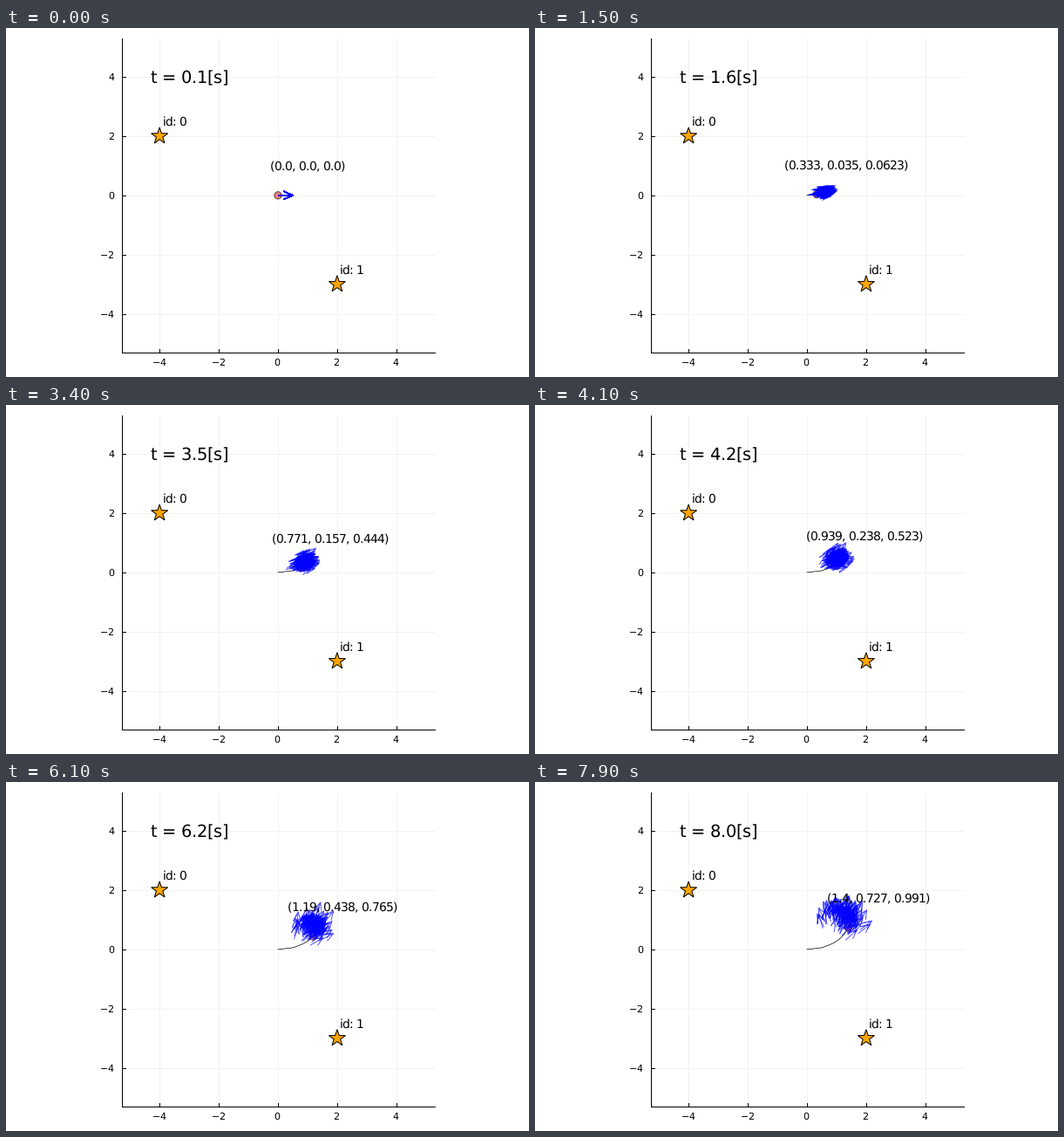
Write a matplotlib script that moves like this. It is 600 px wide and 400 px high and loops after 8 s.

```python
from functools import lru_cache

import matplotlib.pyplot as plt
import numpy as np
from matplotlib.animation import FuncAnimation
from matplotlib.collections import LineCollection
from matplotlib.patches import Circle, PathPatch, Polygon
from matplotlib.path import Path
from matplotlib.textpath import TextPath

W, H, DPI = 600, 400, 100
PX = 72 / DPI                      # one pixel in points
FRAMES, DT = 80, 0.1
UNIT, CX, CY = 33.96, 312, 208.2   # world to pixels, y upwards
LEFT, RIGHT, BOTTOM, TOP = 132.5, 492, 28.5, 388

plt.rcParams["font.family"] = "DejaVu Sans"


def to_px(x, y):
    return CX + UNIT * np.asarray(x), CY + UNIT * np.asarray(y)


# ---- text set with whole-pixel advances ----
@lru_cache(None)
def advance(ch, size):
    right = lambda s: TextPath((0, 0), s, size=100).vertices[:, 0].max()
    return int((right("0" + ch + "0") - right("00")) * size / 100)


@lru_cache(None)
def glyph(ch, size):
    return TextPath((0, 0), ch, size=size)


def text_path(s, cx, cy, size, align=0.5):
    x = round(cx - align * sum(advance(c, size) for c in s))
    y = round(cy - 0.365 * size)
    verts, codes = [], []
    for c in s:
        if c != " ":
            g = glyph(c, size)
            verts.append(g.vertices + [x, y])
            codes.append(g.codes)
        x += advance(c, size)
    return Path(np.concatenate(verts), np.concatenate(codes))


def add_text(s, cx, cy, size, align=0.5):
    patch = PathPatch(text_path(s, cx, cy, size, align), fc="black", lw=0, zorder=9)
    return ax.add_patch(patch)


def number(v):
    s = f"{v:.3g}".replace("e-0", "e-")
    return s if "." in s or "e" in s else s + ".0"


SMALL, MEDIUM, LARGE = 8 / PX, 10 / PX, 14 / PX

# ---- robot pose: cubic path through a few poses (step, x, y, heading) ----
KEYS = np.array([
    (0, 0, 0, 0),
    (15, 0.333, 0.035, 0.0623),
    (26, 0.571, 0.0803, 0.353),
    (41, 0.939, 0.238, 0.523),
    (53, 1.09, 0.346, 0.705),
    (61, 1.19, 0.438, 0.765),
    (79, 1.4, 0.727, 0.991),
])


def pose(step):
    i = min(np.searchsorted(KEYS[:, 0], step, side="right") - 1, len(KEYS) - 2)
    a, b = KEYS[i], KEYS[i + 1]
    u = (step - a[0]) / (b[0] - a[0])
    chord = np.hypot(*(b[1:3] - a[1:3]))
    ta, tb = (chord * np.array([np.cos(k[3]), np.sin(k[3])]) for k in (a, b))
    h = u * u * (3 - 2 * u)
    xy = (a[1:3] * (1 - h) + b[1:3] * h
          + ta * u * (1 - u) ** 2 - tb * u * u * (1 - u))
    return xy[0], xy[1], a[3] + (b[3] - a[3]) * u


poses = np.array([pose(k) for k in range(FRAMES)])


# ---- particle cloud: noisy velocity motion ----
def simulate(count=100, v=0.205, w=0.16, seed=4):
    rng = np.random.default_rng(seed)
    p = np.zeros((count, 3))
    steps = [p.copy()]
    sd_v = 0.19 * np.sqrt(v / DT)
    sd_w = np.sqrt(0.13 ** 2 * v / DT + 0.2 ** 2 * w / DT)
    for _ in range(FRAMES - 1):
        nv = v + sd_v * rng.standard_normal(count)
        nw = w + sd_w * rng.standard_normal(count)
        mid = p[:, 2] + nw * DT / 2
        p += DT * np.column_stack([nv * np.cos(mid), nv * np.sin(mid), nw])
        steps.append(p.copy())
    return steps


cloud = simulate()


def arrows(p, length=0.5 * UNIT, back=10, half=4.5):
    x, y = to_px(p[:, 0], p[:, 1])
    tail = np.column_stack([x, y])
    d = np.column_stack([np.cos(p[:, 2]), np.sin(p[:, 2])])
    n = d[:, ::-1] * [-1, 1]
    tip = tail + length * d
    base = tip - back * d
    return np.stack([tail, tip, base + half * n, tip, base - half * n], axis=1)


# ---- static scene ----
fig = plt.figure(figsize=(W / DPI, H / DPI), dpi=DPI, facecolor="white")
ax = fig.add_axes([0, 0, 1, 1])
ax.set_xlim(0, W)
ax.set_ylim(0, H)
ax.axis("off")


def line(xs, ys, color="black", z=2):
    ax.plot(xs, ys, color=color, lw=PX, zorder=z)


for v in range(-4, 5, 2):
    gx, gy = to_px(v, v)
    line([gx, gx], [BOTTOM, TOP], "#f2f2f2", 1)
    line([LEFT, RIGHT], [gy, gy], "#f2f2f2", 1)
    line([gx, gx], [BOTTOM, BOTTOM + 4])
    line([LEFT, LEFT + 4], [gy, gy])
    label = str(v).replace("-", "\u2212")
    add_text(label, gx, 17, SMALL)
    add_text(label, 124.5, gy, SMALL, align=1)
line([LEFT, LEFT], [BOTTOM, TOP])
line([LEFT, RIGHT], [BOTTOM, BOTTOM])

for i, (sx, sy) in enumerate([(-4, 2), (2, -3)]):
    a = np.pi / 2 + np.arange(10) * np.pi / 5
    r = np.where(np.arange(10) % 2, 3.9, 10)
    cx, cy = to_px(sx, sy)
    ax.add_patch(Polygon(np.column_stack([cx + r * np.cos(a), cy + r * np.sin(a)]),
                         fc="orange", ec="black", lw=PX, zorder=4))
    add_text(f"id: {i}", *to_px(sx + 0.5, sy + 0.5), MEDIUM)

# ---- moving parts ----
trail, = ax.plot([], [], color="black", lw=0.7 * PX, zorder=3)
robot = ax.add_patch(Circle((CX, CY), 4.2, fc=(0.9, 0.2, 0.2, 0.6),
                            ec=(0, 0, 0, 0.6), lw=PX, zorder=5))
swarm = LineCollection([], colors=[(0, 0, 1, 0.65)], linewidths=PX, zorder=6)
ax.add_collection(swarm, autolim=False)
clock = add_text("t", 0, 0, LARGE)
readout = add_text("0", 0, 0, MEDIUM)


def draw(k):
    x, y, _ = poses[k]
    trail.set_data(*to_px(poses[:k + 1, 0], poses[:k + 1, 1]))
    robot.center = to_px(x, y)
    swarm.set_segments(arrows(cloud[k]))
    clock.set_path(text_path(f"t = {(k + 1) * DT:.1f}[s]", *to_px(-3, 4), LARGE))
    values = ", ".join(number(v) for v in poses[k])
    readout.set_path(text_path(f"({values})", *to_px(x + 1, y + 1), MEDIUM))
    return trail, robot, swarm, clock, readout


anim = FuncAnimation(fig, draw, frames=FRAMES, init_func=lambda: draw(0),
                     interval=100, repeat=True, repeat_delay=0, blit=False)
plt.show()
```
